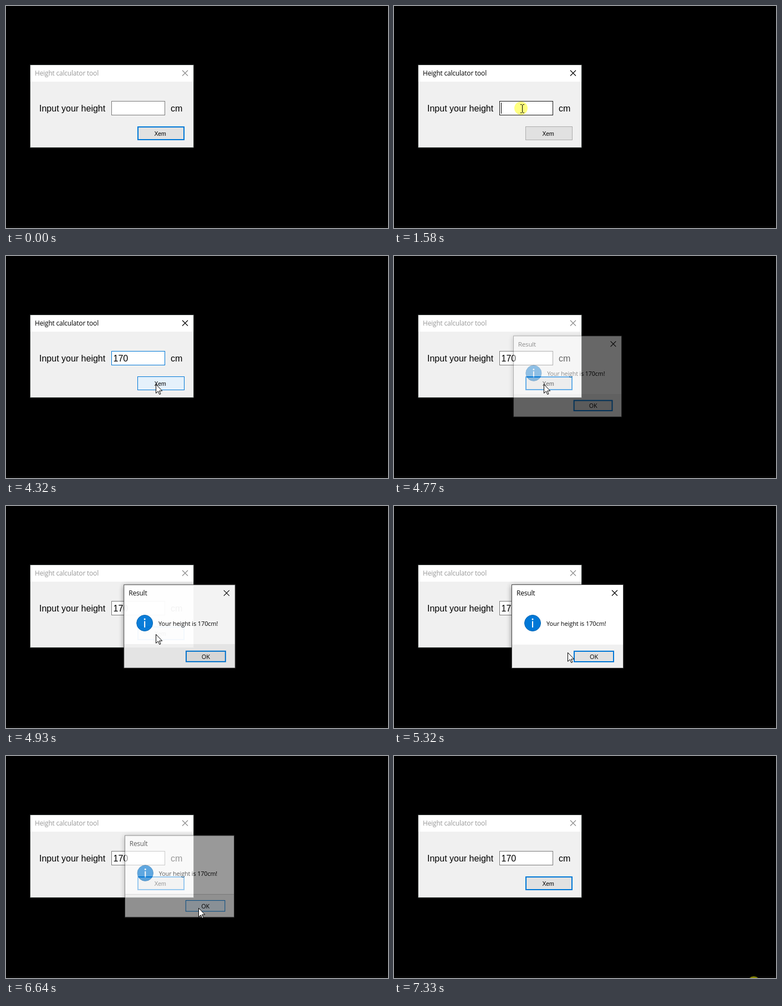
An HTML page that plays this animation: 689x402 px, repeating every 7450 ms.

```html
<!DOCTYPE html>
<html lang="en">
<head>
<meta charset="utf-8">
<title>Height calculator tool</title>
<style>
  html, body { margin: 0; width: 100%; height: 100%; overflow: hidden; background: #000; }
  svg { display: block; width: 689px; height: 402px; }
  text { font: 12px "Open Sans", "Noto Sans", sans-serif; letter-spacing: -.2px; }
  .label { font: 16px "Liberation Sans", Arial, sans-serif; letter-spacing: 0; }
  .small { font: 10.5px "Liberation Sans", Arial, sans-serif; letter-spacing: -.2px; }
  .message { font-size: 11px; letter-spacing: -.1px; }
  .mid { text-anchor: middle; }
  .close { fill: none; stroke-width: 1.1; }
</style>
</head>
<body>
<svg viewBox="0 0 689 402">
  <defs>
    <filter id="shadow" x="-20%" y="-20%" width="140%" height="140%">
      <feDropShadow dx="0" dy="2" stdDeviation="5" flood-opacity=".45"/>
    </filter>
  </defs>
  <rect width="689" height="402"/>
  <rect y="398" width="689" height="4" fill="#060606"/>

  <g id="main">
    <rect x="43" y="106" width="296" height="151" fill="#303633"/>
    <rect x="44" y="107" width="294" height="30" fill="#fff"/>
    <rect x="44" y="137" width="294" height="119" fill="#f0f0f0"/>
    <text id="title" x="52" y="126">Height calculator tool</text>
    <path id="mainClose" class="close" d="M318 116.500l10 10m0-10l-10 10"/>
    <text class="label" x="60" y="191">Input your height</text>
    <rect id="field" x="190.500" y="172.500" width="96" height="25" fill="#fff"/>
    <text id="value" class="label" x="193.500" y="191"></text>
    <rect id="caret" y="175" width="1" height="20"/>
    <text class="label" x="297" y="191">cm</text>
    <rect id="view"/>
    <text class="small mid" x="278" y="235">Xem</text>
  </g>

  <g id="dialog">
    <rect x="212" y="142" width="202" height="152" fill="#4a4a4a" filter="url(#shadow)"/>
    <rect x="213" y="143" width="200" height="108" fill="#fff"/>
    <rect x="213" y="251" width="200" height="42" fill="#f0f0f0"/>
    <text x="221" y="162">Result</text>
    <path id="dialogClose" class="close" stroke="#000" d="M393 152.500l10 10m0-10l-10 10"/>
    <circle cx="250" cy="212" r="14.500" fill="#0078d7" stroke="#0063b1"/>
    <circle cx="250" cy="205" r="1.500" fill="#fff"/>
    <rect x="249" y="208.500" width="2" height="11.500" fill="#fff"/>
    <text class="message" x="275" y="217">Your height is 170cm!</text>
    <rect id="ok"/>
    <text class="message mid" x="360.500" y="277">OK</text>
  </g>

  <circle id="halo" r="12" fill="#ff0" fill-opacity=".5"/>
  <path id="arrow" d="M.5.5V16.500L4.300 13 6.800 18.700 9 17.700 6.600 12.200H11.700Z" fill="#fff" stroke="#000"/>
  <path id="beam" d="M-3 -7.500H-.5M1.500 -7.500H4M.5 -7V7M-3 7.500H-.5M1.500 7.500H4" fill="none" stroke="#000"/>
</svg>
<script>
const LOOP = 7450;
const el = {};
document.querySelectorAll('[id]').forEach(node => el[node.id] = node);

const clamp = v => Math.min(1, Math.max(0, v));
const smooth = v => v * v * (3 - 2 * v);
const within = (t, from, to) => t >= from && t < to;
const set = (node, attrs) => {
  for (const name in attrs) node.setAttribute(name, attrs[name]);
};
const show = (node, on) => set(node, { visibility: on ? 'inherit' : 'hidden' });

// Index of the current step among n even steps from a to b
const stepAt = (t, a, b, n) =>
  Math.min(n - 1, Math.max(0, Math.floor((t - a + 3) / (b - a) * (n - 1))));

// Pointer moves: start, end, number of steps, from, to
const moves = [
  [730, 1350, 9, [222, 294], [231, 186]],
  [3390, 3850, 7, [261, 177], [270, 232]],
  [5005, 5320, 5, [270, 232], [313, 265]],
  [5410, 5790, 6, [313, 265], [347, 275]],
  [6568, 6722, 3, [347, 275], [362, 319]]
];

function pointerAt(t) {
  if (t < 730 || within(t, 2290, 3390) || t >= 6800) return null;
  const [a, b, n, from, to] = moves.filter(m => t >= m[0]).pop();
  const p = smooth(stepAt(t, a, b, n) / (n - 1));
  return from.map((v, i) => Math.round(v + (to[i] - v) * p));
}

const inside = (p, x0, y0, x1, y1) =>
  !!p && p[0] >= x0 && p[0] < x1 && p[1] >= y0 && p[1] < y1;

const buttonStyles = {
  normal: ['#e1e1e1', '#adadad', 1],
  focus: ['#e1e1e1', '#0078d7', 2],
  hover: ['#e5f1fb', '#0078d7', 1]
};

function drawButton(node, x, y, w, h, state) {
  const [fill, stroke, line] = buttonStyles[state];
  set(node, {
    x: x + line / 2, y: y + line / 2, width: w - line, height: h - line,
    fill, stroke, 'stroke-width': line
  });
}

function drawMain(t, pointer, modal) {
  const active = within(t, 1580, 4610) || within(t, 6645, 7330);
  const focused = within(t, 1660, 4610);
  const overField = !modal && inside(pointer, 190, 172, 287, 198);
  const overView = !modal && inside(pointer, 237, 218, 322, 243);

  set(el.title, { fill: active ? '#000' : '#999' });
  set(el.mainClose, { stroke: active ? '#000' : '#8a8a8a' });
  set(el.field, { stroke: focused ? '#0078d7' : overField ? '#171717' : '#7a7a7a' });

  const typed = [2290, 2590, 2840].filter(at => t >= at).length;
  el.value.textContent = '170'.slice(0, typed);
  set(el.caret, { x: 193 + 9 * typed });
  show(el.caret, within(t, 1580, 3390) || within(t, 3850, 4320));

  const idle = within(t, 1580, 4610) ? 'normal' : 'focus';
  drawButton(el.view, 237, 218, 85, 25, overView && t > 3390 ? 'hover' : idle);
  return overField;
}

function drawDialog(t, pointer, modal) {
  show(el.dialog, modal);
  const opening = smooth(clamp(stepAt(t, 4610, 5320, 10) / 4.6));
  const closing = t < 6568 ? 1 : t < 6645 ? .6 : .2;
  const level = Math.min(opening, closing);
  const scale = .95 + .05 * level;
  set(el.dialog, {
    opacity: level,
    transform: `translate(313 218) scale(${scale}) translate(-313 -218)`
  });
  show(el.dialogClose, modal && t < 6490);
  drawButton(el.ok, 324, 262, 73, 21, inside(pointer, 324, 262, 397, 283) ? 'hover' : 'focus');
}

function drawPointer(t, pointer, beam) {
  show(el.arrow, pointer && !beam);
  show(el.beam, pointer && beam);
  if (pointer) set(beam ? el.beam : el.arrow, { transform: `translate(${pointer})` });

  const click = within(t, 1580, 1740) ? [229, 185]
    : within(t, 4090, 4320) ? [270, 232]
    : t >= 7330 ? [649, 411] : null;
  show(el.halo, click);
  if (click) set(el.halo, { cx: click[0], cy: click[1] });
}

function draw(t) {
  const pointer = pointerAt(t);
  const modal = within(t, 4610, 6722);
  const beam = drawMain(t, pointer, modal);
  drawDialog(t, pointer, modal);
  drawPointer(t, pointer, beam);
}

const start = performance.now();
function tick() {
  draw((performance.now() - start) % LOOP);
  requestAnimationFrame(tick);
}
tick();
</script>
</body>
</html>
```
